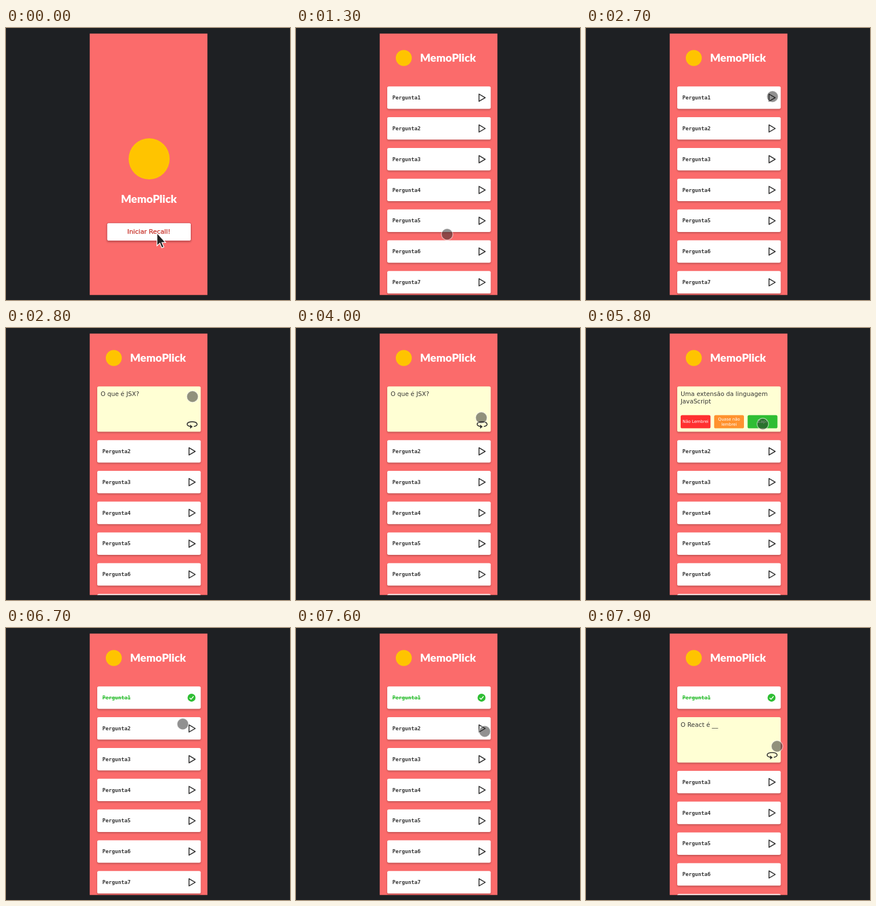
An HTML page for the animation above (8000 ms loop, 498x476 px).

```html
<!DOCTYPE html>
<html lang="pt">
<head>
<meta charset="utf-8">
<title>MemoPlick</title>
<style>
html, body { margin: 0; height: 100%; overflow: hidden; background: #1e2023; }
svg { display: block; width: 498px; height: 476px; font-family: "DejaVu Sans", sans-serif; }
.title { font: 900 19.2px Lato, sans-serif; fill: #fff; }
.label { font: bold 9.15px "DejaVu Sans Mono", monospace; fill: #333; }
.done { fill: #2fbe34; text-decoration: line-through; }
.body { font-size: 10.6px; fill: #333; }
.answer { font-size: 7.2px; fill: #fff; text-anchor: middle; }
.start { font-size: 11.2px; fill: #c4261d; stroke: #c4261d; stroke-width: .25; }
.middle { text-anchor: middle; }
.line { fill: none; stroke: #333; stroke-width: 1.6; stroke-linejoin: round; stroke-linecap: round; }
.card { filter: drop-shadow(0 2px 1.5px rgba(0,0,0,.22)); }
</style>
</head>
<body>
<svg viewBox="0 0 498 476">
  <clipPath id="phone"><path d="M146.8 9.8H353.2V467.2H146.8Z"/></clipPath>
  <g clip-path="url(#phone)">
    <path d="M146 9H354V468H146Z" fill="#fb6b6b"/>
    <g id="screen"></g>
  </g>
  <path id="arrow" d="M264.7 358.5V381L269.8 376.6L273.2 384.7L276.8 383.2L273.4 375.4H279.8Z"
    fill="#222" stroke="#fff" stroke-width="1.3"/>
  <circle id="touch" r="10" fill="rgba(35,35,35,.5)" stroke="rgba(255,255,255,.5)" stroke-width="1.4"/>
</svg>
<script>
const LOOP = 8000, STEP = 100;
const CLOSED = 39.3, OPEN = 79.4, GAP = 14.55;

// Pointer moves: first step, last step, where it ends
const start = { x: 265, y: 361 };
const moves = [
  { from: 2100, to: 2300, x: 343, y: 95 },
  { from: 2500, to: 2700, x: 327, y: 120 },
  { from: 3400, to: 3400, x: 327, y: 129 },
  { from: 3900, to: 4000, x: 325, y: 157 },
  { from: 4300, to: 4300, x: 325, y: 171 },
  { from: 5200, to: 5300, x: 334, y: 206 },
  { from: 5600, to: 5800, x: 310, y: 168 },
  { from: 6900, to: 7000, x: 345, y: 219 },
  { from: 7200, to: 7600, x: 331, y: 181 },
  { from: 7900, to: 7900, x: 335, y: 207 }
];

const scenes = [
  { time: 0, cards: null },
  { time: 1300, cards: [] },
  { time: 2800, cards: ["question"] },
  { time: 4400, cards: ["answer"] },
  { time: 6700, cards: ["done"] },
  { time: 7700, cards: ["done", "question"] }
];
const questions = ["O que é JSX?", "O React é __"];
const answers = [
  ["#ff3030", "Não Lembrei"], ["#ff922e", "Quase não", "lembrei"], ["#2fbe34", "Zap!"]
];

const rect = (x, y, w, h, fill, extra = "") =>
  `<rect x="${x}" y="${y}" width="${w}" height="${h}" rx="2.7" fill="${fill}" ${extra}/>`;
const text = (x, y, cls, s) => `<text x="${x}" y="${y}" class="${cls}">${s}</text>`;
const logo = (x, y, r) => `<circle cx="${x}" cy="${y}" r="${r}" fill="#ffc400"/>`;

const playIcon = '<path class="line" d="M320.9 13.4L331.8 19.8L320.9 26.1Z"/>';
const checkIcon = '<circle cx="325.4" cy="19.7" r="7" fill="#2fbe34"/>' +
  '<path d="M322 20L324.5 22.5L328.9 17.3" fill="none" stroke="#fff" stroke-width="1.4"/>';
const turnIcon = '<path class="line" d="M330 70.1C338 68.6 336.5 61.9 326.4 61.9S314.5 68.6 323 70.1"/>' +
  '<path d="M322.8 66.9L327.4 70.6L322.8 74Z" fill="#333"/>';

const lines = (x, y, gap, cls, rows) =>
  rows.map((row, i) => text(x, y + i * gap, cls, row)).join("");

const answerButtons = () => answers.map(([fill, ...rows], i) => {
  const x = 166 + i * 58.7;
  return rect(x, 50.4, 52.3, 23, fill) +
    lines(x + 26.1, 68.2 - rows.length * 4.2, 8.6, "answer", rows);
}).join("");

function card(i, state) {
  if (state === "question") return text(166, 16.8, "body", questions[i]) + turnIcon;
  if (state === "answer")
    return lines(166, 16.8, 13, "body", ["Uma extensão da linguagem", "JavaScript"]) + answerButtons();
  const done = state === "done";
  return text(169, 22.8, done ? "label done" : "label", "Pergunta" + (i + 1)) +
    (done ? checkIcon : playIcon);
}

function list(states) {
  let y = 102.2;
  let out = logo(189, 52.5, 14) + text(217.5, 59.3, "title", "MemoPlick");
  for (let i = 0; i < 8; i++) {
    const open = states[i] === "question" || states[i] === "answer";
    const h = open ? OPEN : CLOSED;
    out += `<g transform="translate(0 ${y})">` +
      rect(160, 0, 181.5, h, open ? "#ffffd4" : "#fff", 'class="card"') +
      card(i, states[i]) + "</g>";
    y += h + GAP;
  }
  return out;
}

const welcome = () => logo(251, 229, 36) +
  text(250.5, 306.3, "title middle", "MemoPlick") +
  rect(177, 341, 147.5, 31.5, "#fff", 'class="card" stroke="#c8323a" stroke-width=".8"') +
  text(250.5, 359.8, "start middle", "Iniciar Recall!");

// The pointer is redrawn once per step and slows down towards the end of each move
function pointerAt(t) {
  const now = Math.floor(t / STEP) * STEP;
  let { x, y } = start;
  for (const move of moves) {
    if (now < move.from) break;
    const part = Math.min(1, (now - move.from + STEP) / (move.to - move.from + STEP));
    const eased = 1 - (1 - part) ** 2;
    x += (move.x - x) * eased;
    y += (move.y - y) * eased;
  }
  return `translate(${x} ${y})`;
}

const get = id => document.getElementById(id);
let shown;

function draw(t) {
  const scene = scenes.findLast(s => s.time <= t);
  if (scene !== shown) {
    shown = scene;
    get("screen").innerHTML = scene.cards ? list(scene.cards) : welcome();
  }
  const touching = t >= 100;
  get("arrow").style.display = touching ? "none" : "";
  get("touch").style.display = touching ? "" : "none";
  get("touch").setAttribute("transform", pointerAt(t));
}

const begin = performance.now();
function tick() {
  draw((performance.now() - begin) % LOOP);
  requestAnimationFrame(tick);
}
tick();
</script>
</body>
</html>
```
